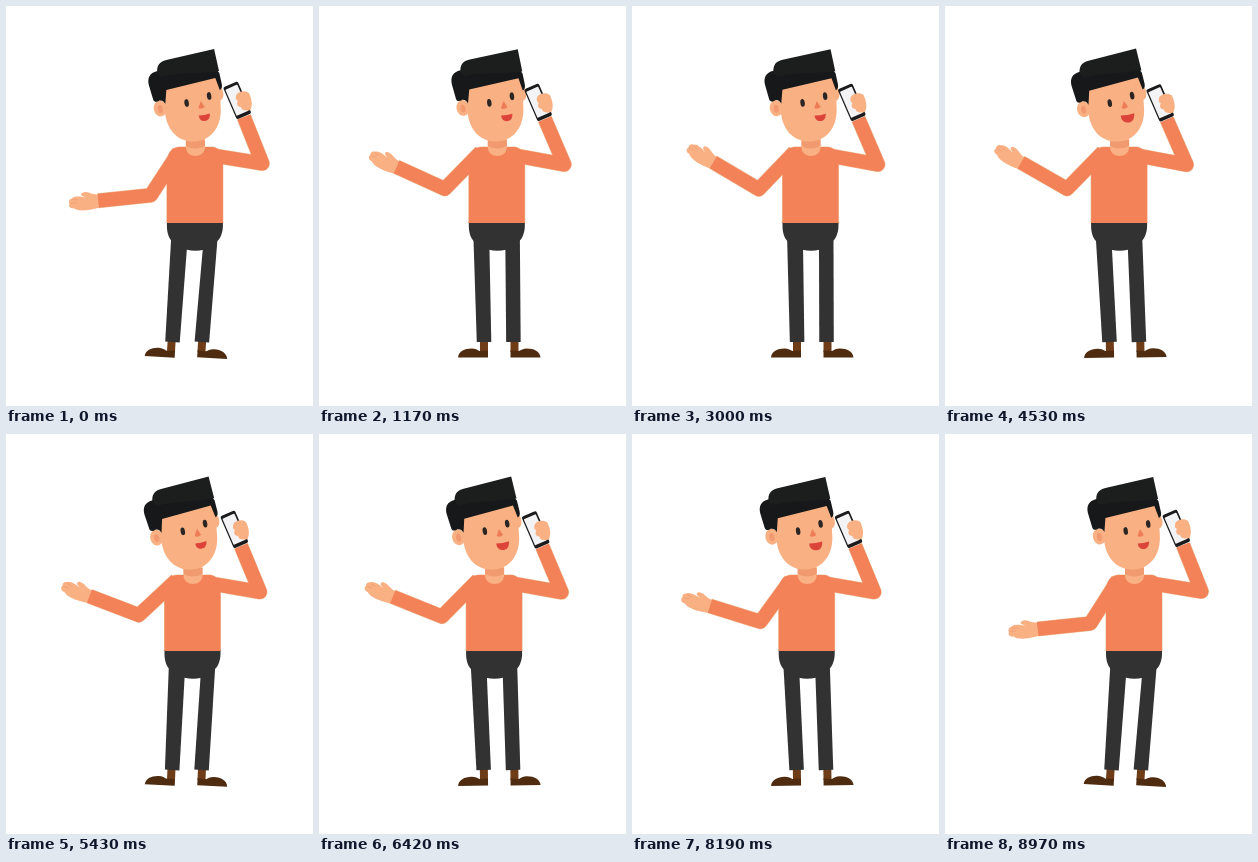
Write an HTML page with a canvas that moves like this. It is 307x400 px and loops after 9 s.

```html
<!DOCTYPE html>
<html lang="en">
<head>
<meta charset="utf-8">
<title>Man on the phone</title>
<style>
html, body { margin: 0; width: 100%; height: 100%; overflow: hidden; background: #fff; }
canvas { display: block; width: 100vw; height: 100vh; }
</style>
</head>
<body>
<canvas id="stage"></canvas>
<script>
const W = 307, H = 400, LOOP = 9000, STEP = 30, RAD = Math.PI / 180;
const SKIN = '#f9b184', SHADE = '#f19a70', SHIRT = '#f48259', EDGE = '#ecc9a4';
const HAIR = '#171819', TOP = '#1c1d1d', PANTS = '#323232', SHOE = '#4f2c10', SOCK = '#6f3c18', RED = '#dd4439';

const canvas = document.getElementById('stage');
const ctx = canvas.getContext('2d');

// [time, value] pairs
const UPPER = [[0, 33], [900, 43.8], [1170, 44.4], [3000, 43.8], [4530, 44.4], [5430, 47], [6300, 45], [7380, 36.6], [8100, 36], [9000, 32.5]];
const FORE = [[0, -6], [900, 28], [1170, 24.4], [2250, 22], [3000, 30.6], [3700, 26], [4530, 29.7], [5430, 21], [6300, 22], [7380, 21.3], [8100, 18], [8970, -6], [9000, -6]];
const TILT = [[0, 0], [1170, 1], [3000, 0.5], [4530, -1.3], [5430, -1.8], [7380, -0.7], [9000, 0]];
const DROP = [[0, 0], [1170, 2], [3000, 2], [4530, 2.5], [5430, 1], [7380, 2], [9000, 0]];

function at(keys, t) {
  let i = 0;
  while (i < keys.length - 2 && t >= keys[i + 1][0]) i++;
  const [t0, a] = keys[i], [t1, b] = keys[i + 1];
  const p = (t - t0) / (t1 - t0);
  return a + (b - a) * p * p * (3 - 2 * p);
}

// torso offset from the upright pose
function sway(t) {
  const d = Math.min(t, LOOP - t) / 260;
  return 2.3 + 6.6 * Math.cos((t + 70) / 1800 * 2 * Math.PI) + 2.2 * Math.exp(-d * d);
}

function fill(d, color) {
  ctx.fillStyle = color;
  ctx.fill(new Path2D(d));
}

function outline(d, color, width) {
  ctx.strokeStyle = color;
  ctx.lineWidth = width;
  ctx.stroke(new Path2D(d));
}

function oval(x, y, rx, ry, color, turn = 0) {
  ctx.fillStyle = color;
  ctx.beginPath();
  ctx.ellipse(x, y, rx, ry, turn, 0, 2 * Math.PI);
  ctx.fill();
}

function box(x, y, w, h, r, color) {
  ctx.fillStyle = color;
  ctx.beginPath();
  ctx.roundRect(x, y, w, h, r);
  ctx.fill();
}

function group(x, y, angle, draw) {
  ctx.save();
  ctx.translate(x, y);
  ctx.rotate(angle * RAD);
  draw();
  ctx.restore();
}

function sleeve(...pts) {
  const d = 'M' + pts.map(p => p.join(' ')).join('L');
  ctx.lineJoin = 'round';
  ctx.lineCap = 'butt';
  outline(d, EDGE, 15);
  outline(d, SHIRT, 14);
}

function foot(x, angle, dir) {
  group(x, 336, angle, () => {
    ctx.scale(dir, 1);
    fill('M-4.500 -1H3.500V10H-4.500Z', SOCK);
    fill('M-26.500 15.500C-26 9.500 -20 6.500 -13 6.500C-9 6.500 -7 8 -5 9L3.500 8.500V15.500Z', SHOE);
  });
}

function legs(x, s) {
  const l = 157.8 + s * 0.13, r = 187.2 + s * 0.13;
  const slant = s * 0.05, turn = s * 0.3;
  foot(165.5 + s * 0.05, turn, 1);
  foot(195 + s * 0.05, turn, -1);
  const leg = (a, ay, b, by, foot) =>
    fill(`M${a} ${ay}L${b} ${by}L${foot + 14.5} ${336 + slant}L${foot} ${336 - slant}Z`, PANTS);
  leg(x + 4.5, 228, x + 20.5, 236, l);
  leg(x + 36.5, 236, x + 51, 228, r);
  group(x, 0, 0, () => fill('M0 216H56V220C56 227 53 234 49 236L44 241C36 246 21 246 13 241L6 236C2 233 0 227 0 220Z', PANTS));
}

const TORSO = 'M0 217V156C1 147 4 142 12 141H46C52 142 56 147 56 153V217';

function torso(x) {
  group(x, 0, 0, () => {
    fill(TORSO, SHIRT);
    fill('M19 132H38V141C38 153 19 153 19 141Z', SKIN);
    fill('M19 134H38V140Q28 145 19 140Z', SHADE);
  });
}

function head(x, tilt, open) {
  group(x + 28, 142, tilt, () => {
    ctx.translate(-189.6, -142);
    oval(155, 102.5, 6.5, 8, SKIN, -0.2);
    oval(213.5, 87, 4.5, 7.5, SKIN, -0.2);
    oval(155, 103, 2.5, 4, SHADE, -0.2);
    fill('M158 82L160 109C163 127 175 136 189 135.500C205 135 215.500 122 215.500 104L214 70Z', SKIN);
    // hair
    fill('M152 65C144 67 142 72 143.500 79L148 94C149 96.500 152 96 154 94.500C157 94 159 96 160 98L161 84L210 72L214.500 84C216.500 83 217 81 216.500 78L214 67L210 62Z', HAIR);
    fill('M208.800 43L161 54C154 55.500 151 60 152 67L156 71C174 66 194 68 213.700 65Z', TOP);
    // face
    oval(181.3, 97, 2.2, 3.9, '#2b2524', -0.15);
    oval(203.8, 90, 2.2, 3.9, '#2b2524', -0.15);
    fill('M195.500 95L193 102Q196 104 199.500 101Z', '#ee7d57');
    const l = 193.5 - open * 1.5, r = 204.5 + open, low = 115 + open * 1.8;
    fill(`M${l} 109.500Q199 109.500 ${r} 107.500C${r + 0.5} ${low - 2} 202 ${low} 199 ${low}C196 ${low} ${l} ${low - 2} ${l} 109.500Z`, RED);
  });
}

function phone(x, drop) {
  group(x - 161 - drop / 2, drop, 0, () => {
    group(217, 81.5, -23.5, () => {
      box(0, 0, 16, 35, 2, '#1b1a1c');
      box(1.3, 3, 13, 28.5, 0.8, '#f3f3f5');
    });
    fill('M231 88C229 91 230 94 232 95C230 98 232 101 235 101C236 105 240 105 244.500 104C247 99 246 93 243 87C240 84 233 85 231 88Z', SKIN);
  });
}

function hand() {
  fill('M-52 -6.500C-58 -6 -61 -10 -66 -10C-69 -10 -70 -8 -68.500 -6.500L-65 -4.500C-71 -6.500 -76 -7.500 -79 -5C-82 -4.500 -83 -1.500 -81.500 0C-84 2 -81 5.500 -78 5C-73 9 -65 9 -52 7Z', SKIN);
  outline('M-81.500 0L-75 -0.500M-78.500 -4L-73 -3', SHADE, 0.7);
}

function arms(x, upper, fore, drop) {
  const sx = x + 12, sy = 146;
  const ex = sx - 51.5 * Math.sin(upper * RAD), ey = sy + 51.5 * Math.cos(upper * RAD);
  group(ex, ey, fore, hand);
  sleeve([sx, sy], [ex, ey], [ex - 53 * Math.cos(fore * RAD), ey - 53 * Math.sin(fore * RAD)]);
  sleeve([x + 47, 149.7], [x + 95.5, 157.5 + drop / 2], [x + 77 - drop / 2, 111 + drop]);
}

function draw(t) {
  const s = sway(t), x = 150 + s, drop = at(DROP, t);
  ctx.fillStyle = '#fff';
  ctx.fillRect(0, 0, W, H);
  group(x, 0, 0, () => outline(TORSO, EDGE, 1));
  legs(x, s);
  arms(x, at(UPPER, t), at(FORE, t), drop);
  torso(x);
  head(x, at(TILT, t), 0.5 - 0.5 * Math.cos(t / 600 * 2 * Math.PI));
  phone(x, drop);
}

function fit() {
  const k = window.devicePixelRatio || 1;
  canvas.width = Math.round(innerWidth * k);
  canvas.height = Math.round(innerHeight * k);
  ctx.setTransform(canvas.width / W, 0, 0, canvas.height / H, 0, 0);
}

const start = performance.now();
function frame() {
  const t = (performance.now() - start) % LOOP;
  draw(Math.floor(t / STEP) * STEP);
  requestAnimationFrame(frame);
}

addEventListener('resize', fit);
fit();
frame();
</script>
</body>
</html>
```
